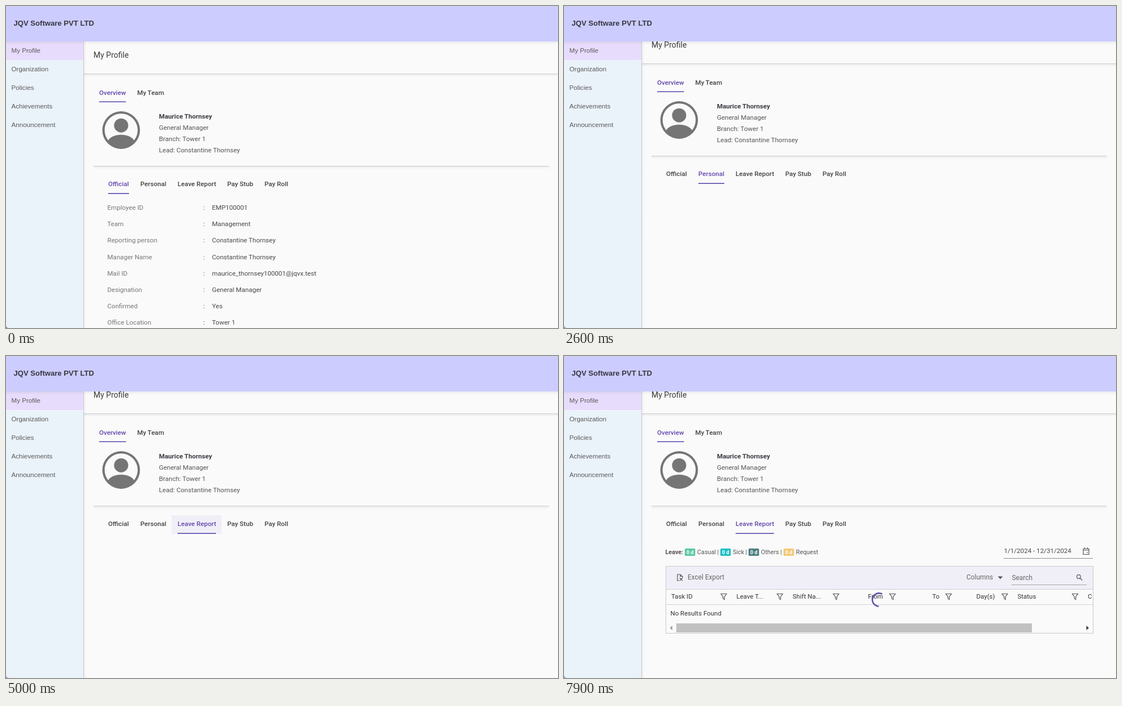
These frames come from a looping animation (978x572 px, 8 s). An HTML page:

```html
<!DOCTYPE html>
<html lang="en">
<head>
<meta charset="utf-8">
<title>Employee profile</title>
<style>
  html, body { margin: 0; width: 100%; height: 100%; overflow: hidden; background: #fafafa; }
  svg { display: block; width: 978px; height: 572px; }
  text { font: 11.6px Roboto, sans-serif; fill: #484848; white-space: pre; }
  .nav text { font: 11.6px "Liberation Sans", Arial, sans-serif; fill: #5a5a5a; }
  .brand { font: bold 13.1px "Liberation Sans", Arial, sans-serif; fill: #363640; }
  .title { font-size: 14px; fill: #3c3c3c; }
  .label { fill: #777; }
  .info { fill: #555; }
  .bold { font-weight: 700; fill: #3c3c44; }
  .tab { font-weight: 500; fill: #444; }
  .tab.on { fill: #6548ad; }
  .small { font-size: 10.8px; fill: #555; }
  .badge { font-size: 9px; font-weight: 700; fill: #fff; text-anchor: middle; }
  .tool { font-size: 11.9px; fill: #666; }
  .head { font-size: 11.5px; fill: #333; }
  .icon { fill: none; stroke: #555; stroke-width: 1.2; }
</style>
</head>
<body>
<svg viewBox="0 0 978 572">
  <defs>
    <linearGradient id="shade" x2="0" y2="1">
      <stop stop-color="#000" stop-opacity=".06"/>
      <stop offset="1" stop-color="#000" stop-opacity="0"/>
    </linearGradient>
    <linearGradient id="side">
      <stop stop-color="#000" stop-opacity=".05"/>
      <stop offset="1" stop-color="#000" stop-opacity="0"/>
    </linearGradient>
    <clipPath id="grid"><rect x="181" y="374" width="756" height="118"/></clipPath>
  </defs>
  <rect width="978" height="572" fill="#fafafa"/>
  <g id="page"></g>
  <g id="report"></g>
  <path id="spinner" fill="none" stroke="#6150a8" stroke-width="2.6"/>
  <g id="frame"></g>
</svg>
<script>
const $ = id => document.getElementById(id);
const page = $('page'), report = $('report'), frame = $('frame'), spinner = $('spinner');

function add(parent, tag, attrs = {}, content) {
  const el = document.createElementNS('http://www.w3.org/2000/svg', tag);
  for (const key in attrs) el.setAttribute(key, attrs[key]);
  if (content !== undefined) el.textContent = content;
  parent.append(el);
  return el;
}
const text = (parent, x, y, content, cls = '') => add(parent, 'text', { x, y, class: cls }, content);
const rect = (parent, x, y, width, height, fill) => add(parent, 'rect', { x, y, width, height, fill });
const path = (parent, d, attrs) => add(parent, 'path', { d, ...attrs });
const show = (el, on) => el.setAttribute('visibility', on ? 'visible' : 'hidden');

// Scrolling page
text(page, 155, 92, 'My Profile', 'title');
rect(page, 138, 120, 840, 1, '#cdcdcd');
rect(page, 138, 121, 840, 5, 'url(#shade)');
text(page, 165, 157.8, 'Overview', 'tab on');
text(page, 232.5, 157.8, 'My Team', 'tab');
rect(page, 165, 169.5, 47.5, 1.5, '#5c45ad');

// Avatar: ring with shoulders cut from a disc, on a 16 unit grid
const avatar = add(page, 'g', { transform: 'translate(170.6 187.1) scale(4.175)', fill: '#757575' });
add(avatar, 'circle', { cx: 8, cy: 6, r: 3 });
path(avatar, 'M0 8a8 8 0 1 1 16 0A8 8 0 0 1 0 8z' +
  'M8 1A7 7 0 0 0 2.53 12.37C3.24 11.23 4.8 10 8 10s4.76 1.23 5.47 2.37A7 7 0 0 0 8 1z',
  { 'fill-rule': 'evenodd' });

text(page, 271, 200.4, 'Maurice Thornsey', 'bold');
['General Manager', 'Branch: Tower 1', 'Lead: Constantine Thornsey']
  .forEach((line, i) => text(page, 271, 220.4 + i * 20, line, 'info'));
rect(page, 155, 284, 807, 1, '#cdcdcd');
rect(page, 155, 285, 807, 5, 'url(#shade)');

const tabs = [['Official', 181, 218], ['Personal', 238, 284], ['Leave Report', 304, 372],
  ['Pay Stub', 392, 438], ['Pay Roll', 458, 500]].map(([name, x, end]) => ({
    hover: rect(page, x - 10.5, 301, end - x + 20.5, 33, '#efefef'),
    line: rect(page, x, 332.4, end - x, 1.6, '#5c45ad'),
    label: text(page, x, 320.4, name, 'tab')
  }));

function details(rows) {
  const group = add(page, 'g');
  rows.forEach(([label, value], i) => {
    const y = 362.2 + i * 29.1;
    text(group, 179.5, y, label, 'label');
    text(group, 349.5, y, ':');
    text(group, 365, y, value);
  });
  return group;
}
const official = details([
  ['Employee ID', 'EMP100001'], ['Team', 'Management'],
  ['Reporting person', 'Constantine Thornsey'], ['Manager Name', 'Constantine Thornsey'],
  ['Mail ID', 'maurice_thornsey100001@jqvx.test'], ['Designation', 'General Manager'],
  ['Confirmed', 'Yes'], ['Office Location', 'Tower 1'],
  ['Date Joined', 'Feb 1, 2004'], ['Experience', '20+ years']]);
const personal = details([
  ['First Name', 'Maurice'], ['Last Name', 'Thornsey'], ['Date of Birth', 'Mar 20, 1982'],
  ['Gender', 'Male'], ["Father's Name", 'Edgar Thornsey'], ["Mother's Name", 'Monica Thornsey'],
  ['Blood Group', 'O+ve'], ['Marital Status', 'Married']]);

// Leave report
text(report, 179.5, 352, 'Leave:', 'small bold');
[['Casual', 214, '#5cc9a0'], ['Sick', 277, '#22bfc6'], ['Others', 327, '#4d8082'], ['Request', 389, '#f3c878']]
  .forEach(([name, x, color], i) => {
    add(report, 'rect', { x, y: 342, width: 18.5, height: 13, rx: 1.5, fill: color });
    text(report, x + 9.3, 352, '0 d', 'badge');
    text(report, x + 22, 352, name, 'small');
    if (i) text(report, x - 5.5, 352, '|', 'small');
  });
text(report, 779.5, 350.4, '1/1/2024 - 12/31/2024');
rect(report, 779, 359, 158, 1, '#8c8c8c');
path(report, 'M920 342.5h10v10h-10z M920 345h10 M922.5 340v3 M927.5 340v3 M926 349.5h2', { class: 'icon' });

rect(report, 181, 374, 756, 40, '#f0eff7');
rect(report, 181, 414, 756, 1, '#cfcfd3');
rect(report, 181, 441, 756, 1, '#d4d4d4');
path(report, 'M209.5 391.5l-3.5-3.5h-5v11h3 M206 388v3.5h4v2 M205 394l5 5 M210 394l-5 5', { class: 'icon' });
text(report, 219, 396.8, 'Excel Export', 'tool');
text(report, 713, 396.8, 'Columns', 'tool');
path(report, 'M768.5 391.5h9l-4.5 4.7z', { fill: '#555' });
text(report, 793.5, 397.6, 'Search', 'tool');
path(report, 'M915.2 392a3.3 3.3 0 1 0-6.6 0a3.3 3.3 0 1 0 6.6 0 M914.3 394.5l4 4', { class: 'icon' });
rect(report, 793, 406, 133, 1, '#a5a5a5');

const cells = add(report, 'g', { 'clip-path': 'url(#grid)' });
[['Task ID', 190, 283], ['Leave T...', 305.5, 382.5], ['Shift Na...', 405, 482], ['From', 538.5, 582],
  ['To', 652.5, 681.5], ['Day(s)', 730.5, 781], ['Status', 803.5, 905.5], ['C', 928]]
  .forEach(([name, x, filter]) => {
    text(cells, x, 431.2, name, 'head');
    if (filter) path(cells, `M${filter - 5} 422.5h10l-3.7 5v5l-2.6-1.6v-3.4z`, { class: 'icon' });
  });
text(report, 188.5, 461.4, 'No Results Found', 'head');
rect(report, 199, 475, 630, 16, '#c1c1c1');
path(report, 'M192 479v8l-4.5-4z', { fill: '#a0a0a0' });
path(report, 'M925.5 479v8l4.5-4z', { fill: '#404040' });
add(report, 'rect', { x: 180.5, y: 373.5, width: 757, height: 119, fill: 'none', stroke: '#c8c8cc' });

// Fixed header and navigation
rect(frame, 0, 63, 138, 509, '#eaf2fa');
rect(frame, 0, 63, 137, 33, '#e8dcfd');
rect(frame, 0, 96, 137, 1, '#f5f7fc');
rect(frame, 137, 63, 1, 509, '#c9cbd0');
rect(frame, 138, 63, 4, 509, 'url(#side)');
const nav = add(frame, 'g', { class: 'nav' });
['My Profile', 'Organization', 'Policies', 'Achievements', 'Announcement']
  .forEach((name, i) => text(nav, 9.5, 83 + i * 33.1, name));
rect(frame, 0, 63, 978, 6, 'url(#shade)');
rect(frame, 0, 0, 978, 63, '#ccccff');
rect(frame, 0, 0, 978, 1, '#d6d6de');
text(frame, 13.5, 35.4, 'JQV Software PVT LTD', 'brand');
path(frame, 'M0 567q.5 4.5 5 5H0z', { fill: '#999' });

const HOVER = '#efefef', RIPPLE = '#f0eff7';
// start, scroll, active tab, hovered tab, hover colour, hover opacity, visible panel
const steps = [
  [0, 0, 0, -1, HOVER, 0, official],
  [500, 73, 0, -1, HOVER, 0, official],
  [1800, 73, 0, 1, HOVER, 1, official],
  [2600, 18, 1, -1, HOVER, 0, null],
  [3100, 18, 1, -1, HOVER, 0, personal],
  [3500, 18, 1, 2, HOVER, .5, personal],
  [3600, 18, 1, 2, HOVER, .9, personal],
  [4100, 18, 1, 2, HOVER, 1, personal],
  [5000, 18, 2, 2, RIPPLE, 1, null],
  [5600, 18, 2, 2, RIPPLE, 1, report],
  [6100, 18, 2, -1, RIPPLE, 0, report]
];

function spin(t) {
  const start = t < 6700 ? 190 + (t - 5600) * 528 / 1100 : 358 + (t - 6700) * 544 / 1200;
  const point = deg => {
    const a = deg * Math.PI / 180;
    return `${558 + 11.6 * Math.sin(a)} ${433 - 11.6 * Math.cos(a)}`;
  };
  spinner.setAttribute('d', `M${point(start)}A11.6 11.6 0 1 1 ${point(start + 208)}`);
}

function render(time) {
  const t = Math.floor(time / 100) * 100;
  const [, scroll, active, hovered, color, opacity, panel] = steps.findLast(s => s[0] <= t);
  page.setAttribute('transform', `translate(0 ${-scroll})`);
  tabs.forEach((tab, i) => {
    tab.label.classList.toggle('on', i === active);
    show(tab.line, i === active);
    tab.hover.setAttribute('fill', color);
    tab.hover.setAttribute('opacity', i === hovered ? opacity : 0);
  });
  [official, personal, report].forEach(p => show(p, p === panel));
  show(spinner, panel === report);
  if (panel === report) spin(t);
}

const begin = performance.now();
function tick() {
  render((performance.now() - begin) % 8000);
  requestAnimationFrame(tick);
}
tick();
</script>
</body>
</html>
```
